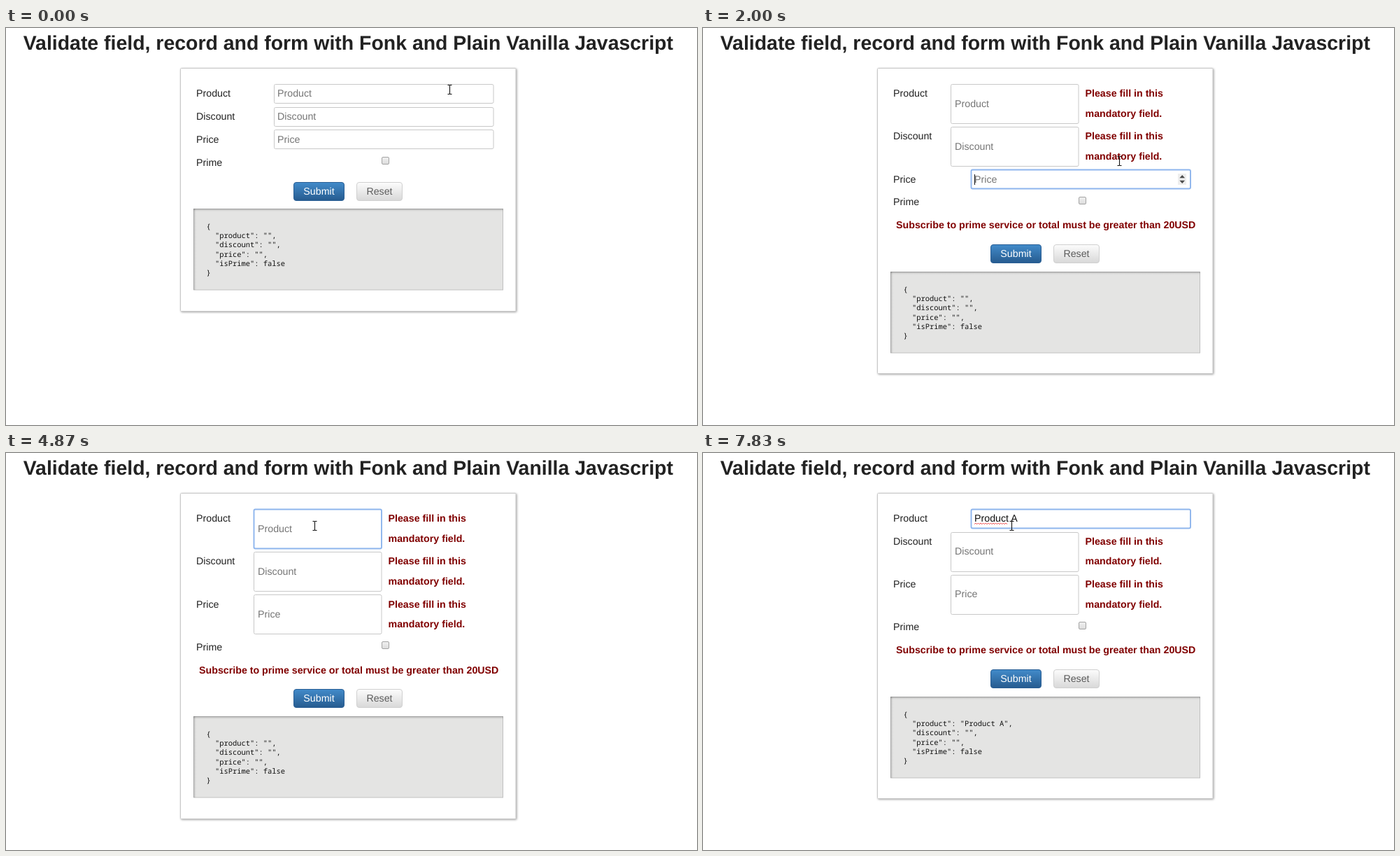
An HTML page for the animation above (8 s loop, 988 by 567 pixels).

```html
<!DOCTYPE html>
<html lang="en">
<head>
<meta charset="utf-8">
<title>Form validation</title>
<style>
html, body { margin: 0; width: 100%; height: 100%; overflow: hidden; background: #fff; }
svg { display: block; width: 988px; height: 567px; }
text { font: 14.22px "Liberation Sans", Arial, sans-serif; fill: #222; white-space: pre; text-rendering: geometricPrecision; }
.title { font-size: 28.44px; font-weight: bold; text-anchor: middle; }
.error { font-weight: bold; fill: #800000; }
.hint { fill: #757575; }
.typed { fill: #111; }
.mid { text-anchor: middle; }
.code { font: 10.43px "Noto Sans Mono", "DejaVu Sans Mono", monospace; fill: #111; }
.card { fill: #fff; stroke: #c8c8c8; filter: drop-shadow(1.8px 1.8px 1.4px rgba(0, 0, 0, .36)); }
</style>
</head>
<body>
<svg viewBox="0 0 988 567">
  <defs>
    <linearGradient id="blue" x2="0" y2="1"><stop stop-color="#428bca"/><stop offset="1" stop-color="#265b8f"/></linearGradient>
    <linearGradient id="grey" x2="0" y2="1"><stop stop-color="#fcfcfc"/><stop offset="1" stop-color="#d8d8d8"/></linearGradient>
    <linearGradient id="box" x2="0" y2="1"><stop stop-color="#f0f0f0"/><stop offset="1" stop-color="#dcdcdc"/></linearGradient>
    <linearGradient id="down" x2="0" y2="1"><stop stop-opacity=".2"/><stop offset="1" stop-opacity="0"/></linearGradient>
    <linearGradient id="right" x2="1" y2="0"><stop stop-opacity=".16"/><stop offset="1" stop-opacity="0"/></linearGradient>
  </defs>
  <g id="scene"></g>
</svg>
<script>
const LOOP = 8000, TICK = 77;
const ROW = 32.7, ERROR_H = 28.44, MESSAGE_H = 32.5;
const scene = document.getElementById('scene');
const pen = document.createElement('canvas').getContext('2d');
pen.font = '14.22px "Liberation Sans", Arial, sans-serif';

const VALUE = 'Product A';
const KEY_TIMES = [5270, 5570, 5740, 5970, 6120, 6290, 6520, 6980, 7300];
const CARET_ON = [[540, 1090], [1380, 1900], [2000, 2540], [4410, 4870], [5270, 7830]];

// Pointer moves: start time, steps, end x, end y, arrow shape
const MOVES = [
  [840, 4, 620, 126, 0], [1230, 1, 613, 128, 0], [1540, 6, 595, 190, 0],
  [2070, 3, 603, 221, 0], [2301, 5, 615, 272, 1], [2690, 1, 619, 284, 0],
  [2770, 1, 617, 283, 1], [3230, 1, 618, 290, 1], [3300, 1, 620, 293, 1],
  [3620, 1, 624, 286, 1], [3700, 1, 635, 262, 1], [3780, 4, 443, 85, 0],
  [4100, 3, 441, 104, 0]
];

const within = (t, from, to) => t >= from && t < to;
const text = (x, y, s, cls = '') => `<text x="${x}" y="${y}" class="${cls}">${s}</text>`;
const rect = (x, y, w, h, attrs) => `<rect x="${x}" y="${y}" width="${w}" height="${h}" ${attrs}/>`;
const path = (d, attrs) => `<path d="${d}" ${attrs}/>`;

function pointerAt(t) {
  let p = { x: 634, y: 88, arrow: 0 };
  for (const [start, n, x, y, arrow] of MOVES) {
    if (t < start) break;
    const k = Math.min(n, Math.floor((t - start) / TICK) + 1) / n;
    p = { x: p.x + (x - p.x) * k, y: p.y + (y - p.y) * k, arrow };
  }
  return p;
}

function focusAt(t) {
  if (within(t, 540, 1380) || t >= 4410) return 0;
  if (within(t, 1380, 2000)) return 1;
  return within(t, 2000, 2770) ? 2 : -1;
}

function pointer({ x, y, arrow }) {
  const shape = arrow
    ? path('M.5.5V14.6L3.8 11.5 6.2 17 8.5 16 6.2 10.7H10.5Z', 'fill="#fff" stroke="#111"')
    : path('M-3-6.5h2L0-6 1-6.5H3M0-6V6M-3 6.5h2L0 6 1 6.5H3', 'fill="none" stroke="#111" stroke-width="1.1"');
  return `<g transform="translate(${Math.round(x) + (arrow ? 0 : .5)} ${Math.round(y)})">${shape}</g>`;
}

function spinner(y) {
  return rect(679, y + 6, 12, 16, 'fill="#eee"') +
    path(`M681.3 ${y + 12.3}h7.8l-3.9-4.3zM681.3 ${y + 15.7}h7.8l-3.9 4.3z`, 'fill="#4c4c4c"');
}

function squiggle(x, y, width) {
  const d = `M${x} ${y}` + 'l1.8-1.8 1.8 1.8'.repeat(Math.floor(width / 3.6));
  return path(d, 'fill="none" stroke="#e33" stroke-width=".9"');
}

function field(f, t, pt) {
  const x = f.error ? 354 : 383, w = f.error ? 183 : 314, h = f.error ? 56 : 27;
  const y = Math.round(f.top), base = f.top + (f.error ? 32.6 : 18.3), tx = x + (f.error ? 6 : 5);
  const ring = f.focus ? 'stroke="#8eb5ed" stroke-width="1.9"' : 'stroke="#c8c8c8"';
  const hover = pt.x > x && pt.x < x + w && pt.y > y && pt.y < y + h;
  let out = rect(x + .5, y + .5, w - .5, h, `rx="2" fill="#fff" ${ring}`);
  out += text(tx, base, f.value || f.name, f.value ? 'typed' : 'hint');
  if (f.numeric && !f.error && (hover || f.focus)) out += spinner(y);
  if (f.value && t >= 6980) out += squiggle(388, y + 21.8, 49);
  if (f.focus && CARET_ON.some(([a, b]) => within(t, a, b))) {
    const cx = Math.floor(tx + pen.measureText(f.value).width);
    out += rect(cx, Math.round(base - 12), 1, 15, 'fill="#111"');
  }
  if (f.error) {
    out += text(546.5, f.top + 18.3, 'Please fill in this', 'error') +
      text(546.5, f.top + 18.3 + ERROR_H, 'mandatory field.', 'error');
  }
  return out;
}

function button(x, y, w, label, fill, stroke, color) {
  return rect(x + .5, y + .5, w, 26, `rx="3.5" fill="url(#${fill})" stroke="${stroke}"`) +
    `<text x="${x + .5 + w / 2}" y="${y + 18}" class="mid" style="fill:${color}">${label}</text>`;
}

function output(y, value) {
  const lines = ['{', `  "product": "${value}",`, '  "discount": "",', '  "price": "",', '  "isPrime": false', '}'];
  return rect(268.5, y + .5, 442, 115.5, 'fill="#e4e4e3" stroke="#c0c0c0"') +
    rect(268, y, 443, 4, 'fill="url(#down)"') + rect(268, y, 4, 116, 'fill="url(#right)"') +
    lines.map((s, i) => text(286.5, y + 28.6 + i * 13.3, s, 'code')).join('');
}

function draw(t) {
  const pt = pointerAt(t), focus = focusAt(t);
  const typed = VALUE.slice(0, KEY_TIMES.filter(k => t >= k).length);
  const errors = [within(t, 1380, 5270), t >= 2000, t >= 2770];
  const message = t >= 2000;
  let grow = 0, rows = '';
  ['Product', 'Discount', 'Price'].forEach((name, i) => {
    const top = 80 + ROW * i + grow;
    rows += text(272, top + 18.3, name) +
      field({ name, top, error: errors[i], focus: focus === i, numeric: i > 0, value: i ? '' : typed }, t, pt);
    if (errors[i]) grow += ERROR_H;
  });
  rows += text(272, 196.5 + grow, 'Prime') +
    rect(537.5, Math.round(184 + grow) + .5, 10, 10, 'rx="1.5" fill="url(#box)" stroke="#a4a4a4"');
  if (message) {
    rows += text(490.2, 229.5 + grow, 'Subscribe to prime service or total must be greater than 20USD', 'error mid');
    grow += MESSAGE_H;
  }
  const by = Math.round(219.5 + grow);
  return text(489.3, 31, 'Validate field, record and form with Fonk and Plain Vanilla Javascript', 'title') +
    rect(249.5, 57.5, 479.5, Math.round(347 + grow), 'rx="1" class="card"') + rows +
    button(411, by, 72, 'Submit', 'blue', '#2a5f95', '#fff') +
    button(501, by, 65, 'Reset', 'grey', '#d0d0d0', '#5c5c5c') +
    output(Math.round(258.4 + grow), typed) + pointer(pt);
}

let last = '';
function frame(now) {
  const markup = draw(now % LOOP);
  if (markup !== last) scene.innerHTML = last = markup;
  requestAnimationFrame(frame);
}
frame(performance.now());
</script>
</body>
</html>
```
